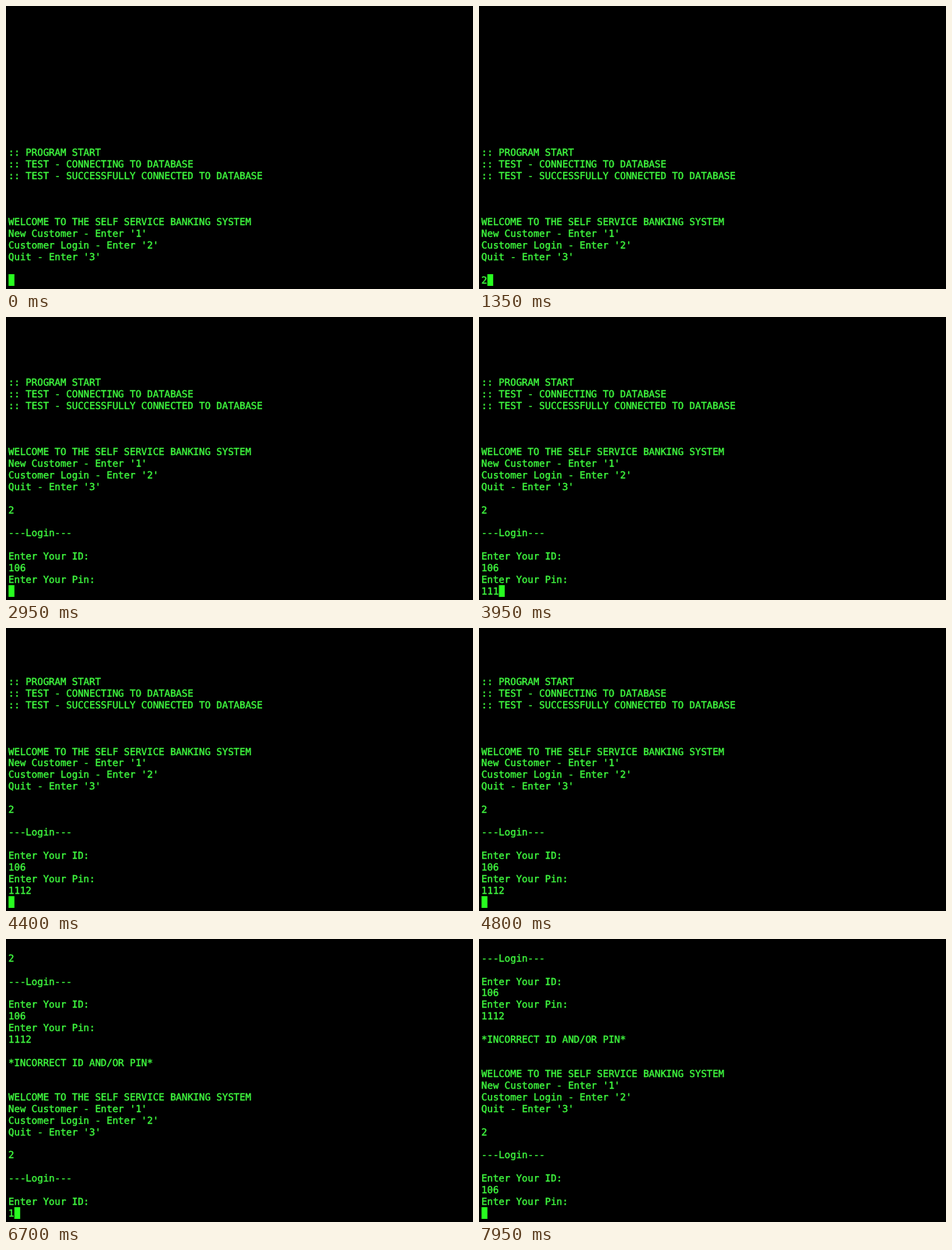
Write an HTML page that moves like this. It is 600 px wide and 363 px high and loops after 8000 ms.

```html
<!DOCTYPE html>
<html lang="en">
<head>
<meta charset="utf-8">
<title>Banking terminal</title>
<style>
  html, body { margin: 0; width: 100%; height: 100%; overflow: hidden; background: #000; }
  #stage { position: relative; width: 600px; height: 363px; overflow: hidden; clip-path: inset(4px 0 0); }
  #screen {
    position: absolute; left: 3.1px; bottom: 3.65px; margin: 0;
    font: 12.33px/14.85px "DejaVu Sans Mono", monospace;
    font-variant-ligatures: none;
    text-rendering: geometricPrecision;
    color: #40ff40;
    -webkit-text-stroke: 0.35px #40ff40;
  }
  svg { position: absolute; left: 0; top: 0; }
  #cursor { fill: #28fe20; }
</style>
</head>
<body>
<div id="stage">
  <pre id="screen"></pre>
  <svg width="600" height="363"><rect id="cursor" y="344" width="7.5" height="15"/></svg>
</div>
<script>
const LOOP = 8000;
const CELL = 7.423;
const CURSOR_X = 3.3;

const menu = `WELCOME TO THE SELF SERVICE BANKING SYSTEM
New Customer - Enter '1'
Customer Login - Enter '2'
Quit - Enter '3'

`;
const boot = `:: PROGRAM START
:: TEST - CONNECTING TO DATABASE
:: TEST - SUCCESSFULLY CONNECTED TO DATABASE



`;
const login = '\n\n---Login---\n\nEnter Your ID:\n';
const askPin = '\nEnter Your Pin:\n';

// Text appended to the terminal at each time (ms)
const output = [
  [0, boot + menu],
  [1350, '2'], [1550, login],
  [2150, '1'], [2350, '0'], [2650, '6'], [2950, askPin],
  [3500, '1'], [3650, '1'], [3800, '1'], [4000, '2'], [4400, '\n'],
  [4950, '\n*INCORRECT ID AND/OR PIN*\n\n\n' + menu],
  [5750, '2'], [6000, login],
  [6650, '1'], [7000, '0'], [7400, '6'], [7700, askPin]
];

// Intervals in which the cursor is hidden
const hidden = [[500, 1000], [2050, 2150], [3450, 3500], [5500, 5750], [6550, 6650]];

const screen = document.getElementById('screen');
const cursor = document.getElementById('cursor');
let shown = '';

function render(t) {
  const text = output.filter(([at]) => at <= t).map(([, part]) => part).join('');
  if (text !== shown) {
    shown = text;
    // A trailing zero-width space keeps an empty last row
    screen.textContent = text + '\u200b';
    const column = text.length - text.lastIndexOf('\n') - 1;
    cursor.setAttribute('x', CURSOR_X + column * CELL);
  }
  const off = hidden.some(([from, to]) => t >= from && t < to);
  cursor.style.visibility = off ? 'hidden' : 'visible';
}

function tick() {
  render(performance.now() % LOOP);
  requestAnimationFrame(tick);
}

render(0);
requestAnimationFrame(tick);
</script>
</body>
</html>
```
